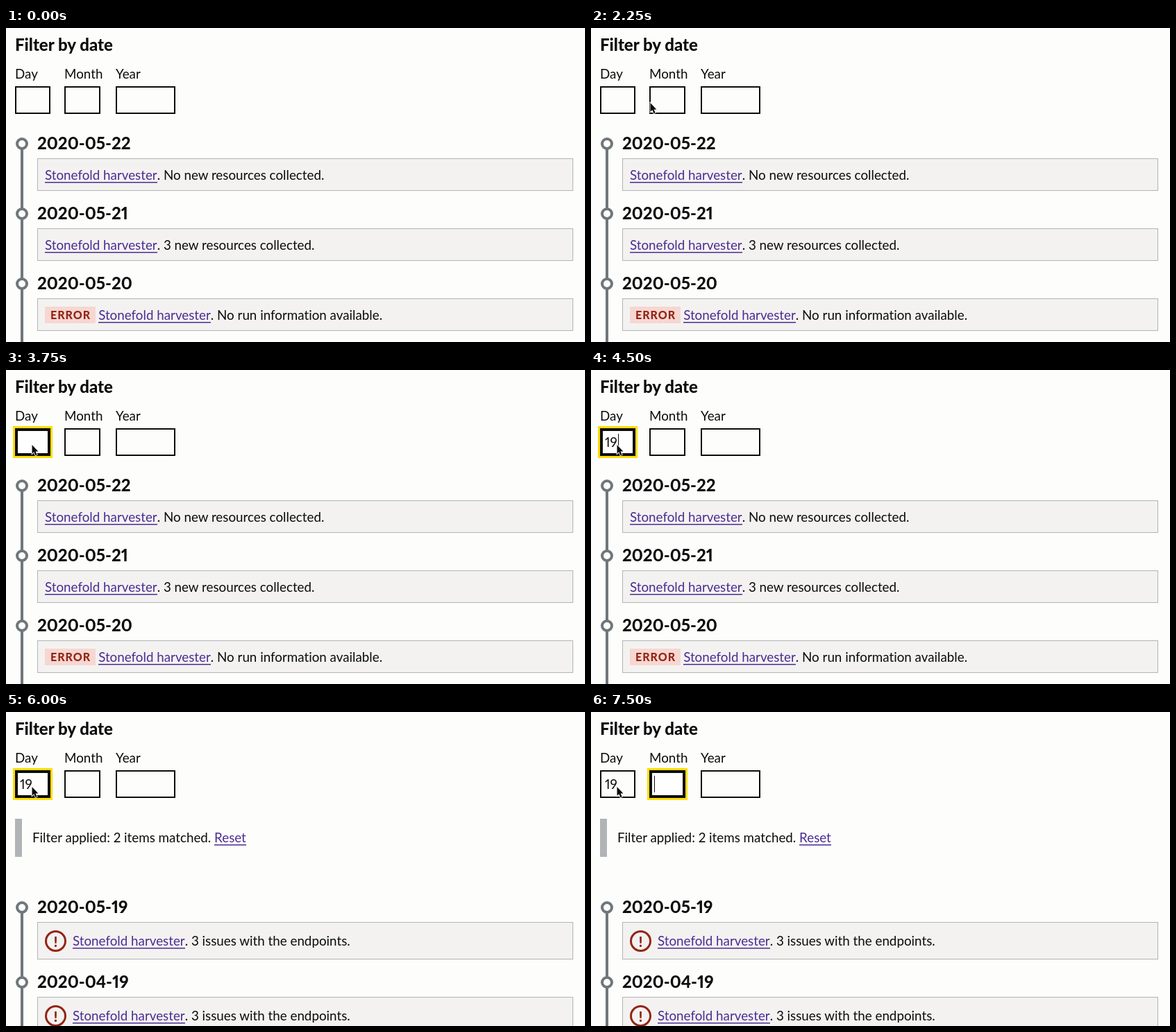
These frames come from a looping animation (834 by 453 pixels, 8000 ms). An HTML page:

```html
<!DOCTYPE html>
<html lang="en">
<head>
<meta charset="utf-8">
<title>Filter by date</title>
<style>
  html, body { margin: 0; width: 100%; height: 100%; overflow: hidden; background: #fdfdfc; }
  body { position: relative; font: 18.8px/20px Lato, sans-serif; color: #0b0c0c; font-variant: no-common-ligatures proportional-nums; }
  body *, .view { box-sizing: border-box; }
  .abs, .view, .view > *, .field, .entry > * { position: absolute; white-space: pre; }
  .view { inset: 0; }
  h1, h2 { margin: 0; font-size: 24px; line-height: 24px; font-weight: 800; position: absolute; white-space: pre; }
  h1 { left: 13px; top: 12px; }
  .field { top: 84px; height: 40px; border: 2px solid #0b0c0c; padding: 8px 5px; }
  .field.focus { outline: 3px solid #fd0; border-width: 4px; padding: 6px 3px; background: #fff; }
  .rail { left: 21px; width: 4px; bottom: 0; background: #6f777b; }
  .entry { left: 0; width: 100%; }
  .dot { left: 14px; top: 0; width: 18px; height: 18px; border: 4px solid #6f777b; border-radius: 50%; background: #fdfdfc; }
  .entry h2 { left: 45px; top: -4px; }
  .panel { left: 45px; top: 30px; width: 772px; height: 47px; border: 1px solid #b1b4b6; background: #f3f2f1; display: flex; align-items: center; padding-left: 10px; }
  .panel.tall { height: 54px; }
  .link { color: #4c2c92; box-shadow: 0 1.5px #4c2c92; display: inline-block; height: 20px; }
  .tag { background: #f6d7d2; color: #942514; font: 800 16px/24px Lato, sans-serif; letter-spacing: 1px; padding: 0 7px 0 8px; margin-right: 4px; }
  .alert { width: 31px; height: 31px; border: 3px solid #942514; border-radius: 50%; color: #942514; font: 800 21px/25px Lato, sans-serif; text-align: center; margin-right: 9px; }
  .inset { left: 13px; top: 154px; height: 55px; border-left: 10px solid #b1b4b6; padding: 17px 0 0 15px; }
  #caret { top: 92px; width: 1px; height: 24px; background: #0b0c0c; }
  #pointer { left: 0; top: 0; overflow: visible; }
</style>
</head>
<body>
<h1>Filter by date</h1>
<span class="abs" style="left:13px;top:56px">Day</span>
<span class="abs" style="left:84px;top:56px">Month</span>
<span class="abs" style="left:158px;top:56px">Year</span>
<div class="field" id="day" style="left:13px;width:51px"></div>
<div class="field" id="month" style="left:84px;width:52px"></div>
<div class="field" style="left:158px;width:86px"></div>

<div class="view" id="all"><div class="rail" style="top:167px"></div></div>
<div class="view" id="filtered">
  <div class="inset">Filter applied: 2 items matched. <span class="link">Reset</span></div>
  <div class="rail" style="top:282px"></div>
</div>

<div class="abs" id="caret"></div>
<svg class="abs" id="pointer" width="12" height="19">
  <path d="M.5 0V12.8L3.3 10.2 5.4 15.2 7.7 14.2 5.6 9.4H9.4Z" fill="#0b0c0c" stroke="#fff" stroke-width="1.6" paint-order="stroke"/>
</svg>

<script>
const $ = id => document.getElementById(id);
const LOOP = 8000;

function addEntry(view, top, date, message, badge = '', tall = '') {
  view.insertAdjacentHTML('beforeend', `<div class="entry" style="top:${top}px">
    <div class="dot"></div><h2>${date}</h2>
    <div class="panel ${tall}">${badge}<span><span class="link">Stonefold harvester</span>. ${message}</span></div></div>`);
}

const tag = '<span class="tag">ERROR</span>';
const alertIcon = '<span class="alert">!</span>';
addEntry($('all'), 158, '2020-05-22', 'No new resources collected.');
addEntry($('all'), 259, '2020-05-21', '3 new resources collected.');
addEntry($('all'), 360, '2020-05-20', 'No run information available.', tag);
for (const [top, date] of [[273, '2020-05-19'], [381, '2020-04-19']])
  addEntry($('filtered'), top, date, '3 issues with the endpoints.', alertIcon, 'tall');

// Each step: start time, then the values held until the next step.
const pointerSteps = [[0, -50, -50], [250, 196, 83], [500, 161, 98], [750, 118, 106],
  [1000, 101, 108], [2250, 85, 108], [2500, 38, 108], [2750, 37, 108]];
const caretSteps = [[0, null], [3000, 20], [3750, null], [4250, 20], [4500, 39], [4750, null],
  [5500, 39], [6000, null], [6250, 91], [7000, null], [7500, 91]];
const held = (steps, t) => steps.findLast(step => step[0] <= t).slice(1);
const show = (el, on) => el.style.visibility = on ? 'visible' : 'hidden';

function render(now) {
  const t = now % LOOP;
  const [x, y] = held(pointerSteps, t);
  $('pointer').style.transform = `translate(${x}px, ${y}px)`;
  const [caretX] = held(caretSteps, t);
  show($('caret'), caretX !== null);
  $('caret').style.left = `${caretX}px`;
  $('day').textContent = t >= 4500 ? '19' : '';
  $('day').classList.toggle('focus', t >= 3000 && t < 6250);
  $('month').classList.toggle('focus', t >= 6250);
  show($('all'), t < 4750);
  show($('filtered'), t >= 4750);
  requestAnimationFrame(render);
}
render(0);
</script>
</body>
</html>
```
